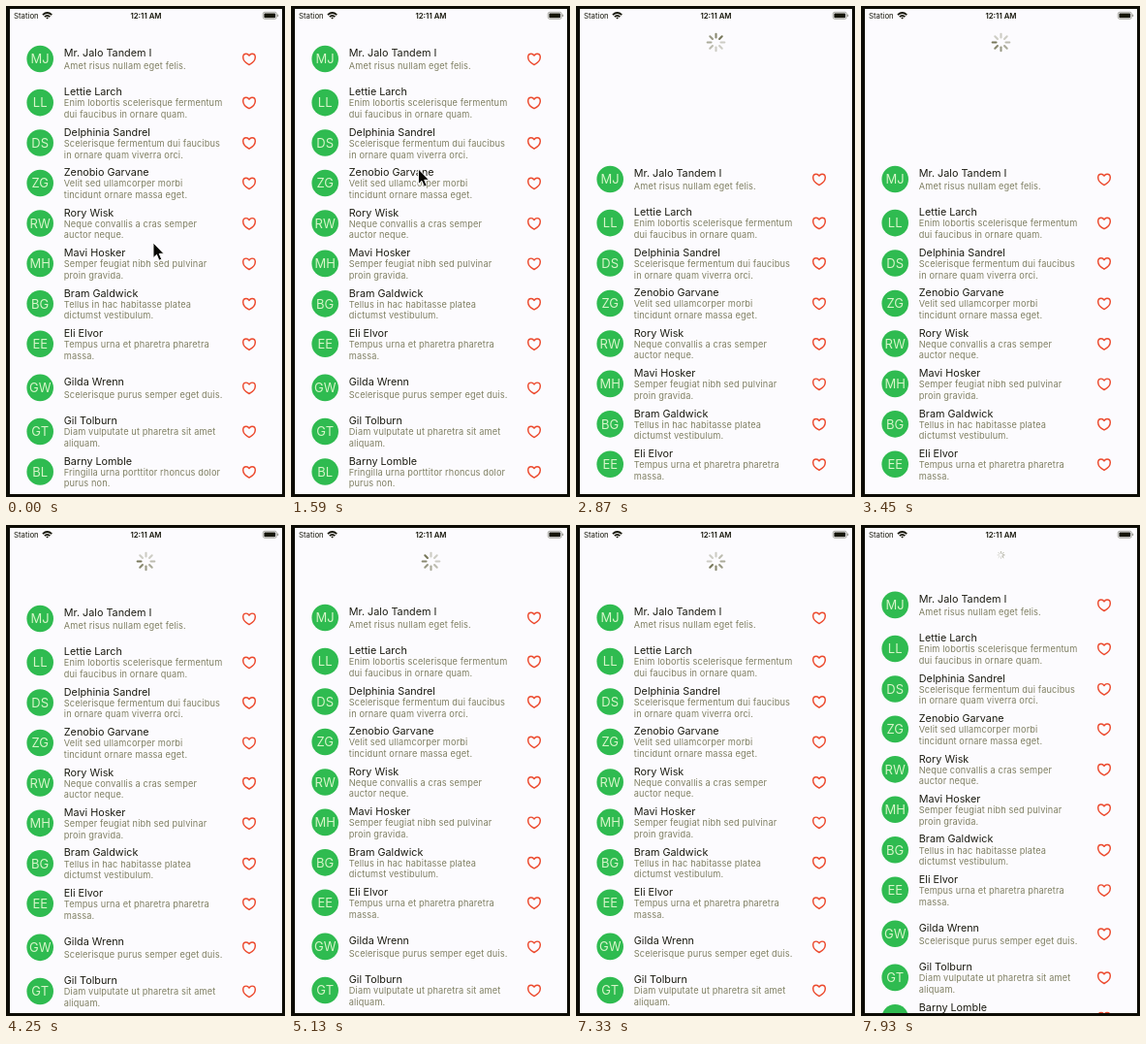
An HTML page for the animation above (8 s loop, 288 by 506 pixels).

```html
<!DOCTYPE html>
<html lang="en">
<head>
<meta charset="utf-8">
<title>Pull to refresh</title>
<style>
  html, body { margin: 0; width: 100%; height: 100%; overflow: hidden; background: #0c0b04; }
  svg { display: block; width: 100vw; height: 100vh; font-family: Inter, "Open Sans", sans-serif; }
  .title { font-size: 10.8px; fill: #1c1c12; }
  .note { font-size: 9.2px; letter-spacing: .13px; fill: #7f7f62; }
  .initials { font-size: 13px; fill: #d6f5c8; text-anchor: middle; }
  .avatar { fill: #2fbb50; }
  .heart { fill: none; stroke: #ec4a2e; stroke-width: 1.45; stroke-linejoin: round; }
  .status { font-size: 7.8px; fill: #16160a; }
  .clock { font-weight: 600; text-anchor: middle; }
  .spoke { stroke: #77775a; stroke-width: 2.1; stroke-linecap: round; }
</style>
</head>
<body>
<svg viewBox="0 0 288 506">
  <defs>
    <clipPath id="screen"><rect x="4" y="3" width="281" height="500"/></clipPath>
    <path id="heart" d="M0 5.7C-1.8 4.8-6.3 1.7-6.3-2.1C-6.3-4.2-4.9-5.7-3-5.7C-1.7-5.7-.7-5 0-3.8C.7-5 1.7-5.7 3-5.7C4.9-5.7 6.3-4.2 6.3-2.1C6.3 1.7 1.8 4.8 0 5.7Z"/>
  </defs>
  <rect width="288" height="506" fill="#0c0b04"/>
  <g clip-path="url(#screen)">
    <rect x="4" y="3" width="281" height="500" fill="#fcfbfe"/>
    <g id="spinner"></g>
    <g id="list"></g>
    <text class="status" x="8" y="13.2">Station</text>
    <g fill="none" stroke="#16160a" stroke-width="1.7" transform="translate(-.4 0)">
      <path d="M38.3 9.2Q43 4.8 47.7 9.2M40.2 11.2Q43 8.6 45.8 11.2"/>
      <path d="M43 13.6L41.6 12.1Q43 11 44.4 12.1Z" fill="#16160a" stroke="none"/>
    </g>
    <text class="status clock" x="144.5" y="13.2">12:11 AM</text>
    <g fill="#16160a">
      <rect x="265.2" y="6.3" width="14.2" height="7" rx="1.9" fill="none" stroke="#8a8a80" stroke-width=".7"/>
      <rect x="266.4" y="7.4" width="11.8" height="4.8" rx="1"/>
      <rect x="280.2" y="8.6" width="1" height="2.4" rx=".5" fill="#8a8a80"/>
    </g>
  </g>
  <path id="cursor" d="M0 0V15.6L3.5 12.3L6 18.2L8.7 17L6.2 11.3H11Z" fill="#080804" stroke="#fff" stroke-width=".9"/>
</svg>
<script>
const LOOP = 8000, REST = 41, RELEASE = 3600, FINISH = 7780;
const DRAG_START = 1600, GRAB_Y = 168, MAX_PULL = 124;
const SPOKES = 8, TURN = 800;

const people = [
  ['MJ', 'Mr. Jalo Tandem I', 'Amet risus nullam eget felis.'],
  ['LL', 'Lettie Larch', 'Enim lobortis scelerisque fermentum', 'dui faucibus in ornare quam.'],
  ['DS', 'Delphinia Sandrel', 'Scelerisque fermentum dui faucibus', 'in ornare quam viverra orci.'],
  ['ZG', 'Zenobio Garvane', 'Velit sed ullamcorper morbi', 'tincidunt ornare massa eget.'],
  ['RW', 'Rory Wisk', 'Neque convallis a cras semper', 'auctor neque.'],
  ['MH', 'Mavi Hosker', 'Semper feugiat nibh sed pulvinar', 'proin gravida.'],
  ['BG', 'Bram Galdwick', 'Tellus in hac habitasse platea', 'dictumst vestibulum.'],
  ['EE', 'Eli Elvor', 'Tempus urna et pharetra pharetra', 'massa.'],
  ['GW', 'Gilda Wrenn', 'Scelerisque purus semper eget duis.'],
  ['GT', 'Gil Tolburn', 'Diam vulputate ut pharetra sit amet', 'aliquam.'],
  ['BL', 'Barny Lomble', 'Fringilla urna porttitor rhoncus dolor', 'purus non.']
];

const $ = id => document.getElementById(id);
const clamp = (v, lo = 0, hi = 1) => Math.min(hi, Math.max(lo, v));
const smooth = p => p * p * (3 - 2 * p);

const text = (cls, x, y, s) => `<text class="${cls}" x="${x}" y="${y}">${s}</text>`;

function row([initials, name, ...notes], y) {
  const single = notes.length === 1;
  const lines = single ? [10.8] : [3.8, 15.5];
  return `<g transform="translate(0 ${y})">
    <circle class="avatar" cx="35.2" r="13.8"/>
    ${text('initials', 35.2, 4.8, initials)}
    ${text('title', 59.8, single ? -2.5 : -7.3, name)}
    ${notes.map((s, i) => text('note', 59.8, lines[i], s)).join('')}
    <use class="heart" href="#heart" x="251" y=".4"/></g>`;
}

let y = 54.5;
$('list').innerHTML = people.map((person, i) => {
  const markup = row(person, y);
  const next = people[i + 1];
  y += person.length === 3 || (next && next.length === 3) ? 45.1 : 41.45;
  return markup;
}).join('');

$('spinner').innerHTML = Array.from({ length: SPOKES }, (_, i) =>
  `<line class="spoke" y1="-5" y2="-8.8" transform="rotate(${i * 360 / SPOKES})"/>`).join('');
const spokes = [...$('spinner').children];

// time, x, y
const cursorKeys = [
  [0, 152, 244], [300, 152, 244], [1350, 131.5, 168], [DRAG_START, 131.5, 168],
  [2290, 122, 471], [2400, 122, 474], [2800, 119, 514]
];

function cursorAt(t) {
  const i = cursorKeys.findIndex(k => k[0] > t);
  if (i < 0) return cursorKeys[cursorKeys.length - 1].slice(1);
  const [a, b] = [cursorKeys[i - 1], cursorKeys[i]];
  const p = smooth((t - a[0]) / (b[0] - a[0]));
  return [1, 2].map(n => a[n] + (b[n] - a[n]) * p);
}

function rubberBand(distance) {
  const d = Math.max(0, distance) * .53;
  return Math.min(MAX_PULL, d * 500 / (d + 500));
}

function pullAt(t, cursorY) {
  if (t < DRAG_START) return 0;
  if (t < RELEASE) return rubberBand(cursorY - GRAB_Y);
  const x = (t - RELEASE) / 100;
  const settled = REST + (MAX_PULL - REST) * (1 + x) * Math.exp(-x);
  return settled * (1 - smooth(clamp((t - FINISH) / 400)));
}

function drawSpinner(t, pull) {
  const filled = t < RELEASE ? clamp((pull - 20) / 70) * SPOKES : SPOKES;
  const scale = 1 - clamp((t - FINISH) / 250);
  $('spinner').setAttribute('transform',
    `translate(144.5 ${17 + Math.min(pull, REST) / 2}) scale(${scale})`);
  const head = Math.floor((t / TURN + .55) * SPOKES);
  spokes.forEach((spoke, i) => {
    const age = (head - i + SPOKES) % SPOKES;
    const shade = filled < SPOKES ? .6 : Math.max(.35, 1 - age * .13);
    spoke.style.opacity = shade * clamp(filled - i);
  });
}

const start = performance.now();
function draw() {
  const t = (performance.now() - start) % LOOP;
  const [cx, cy] = cursorAt(t);
  const pull = pullAt(t, cy);
  $('cursor').setAttribute('transform', `translate(${cx} ${cy})`);
  $('list').setAttribute('transform', `translate(0 ${pull})`);
  drawSpinner(t, pull);
  requestAnimationFrame(draw);
}
draw();
</script>
</body>
</html>
```
